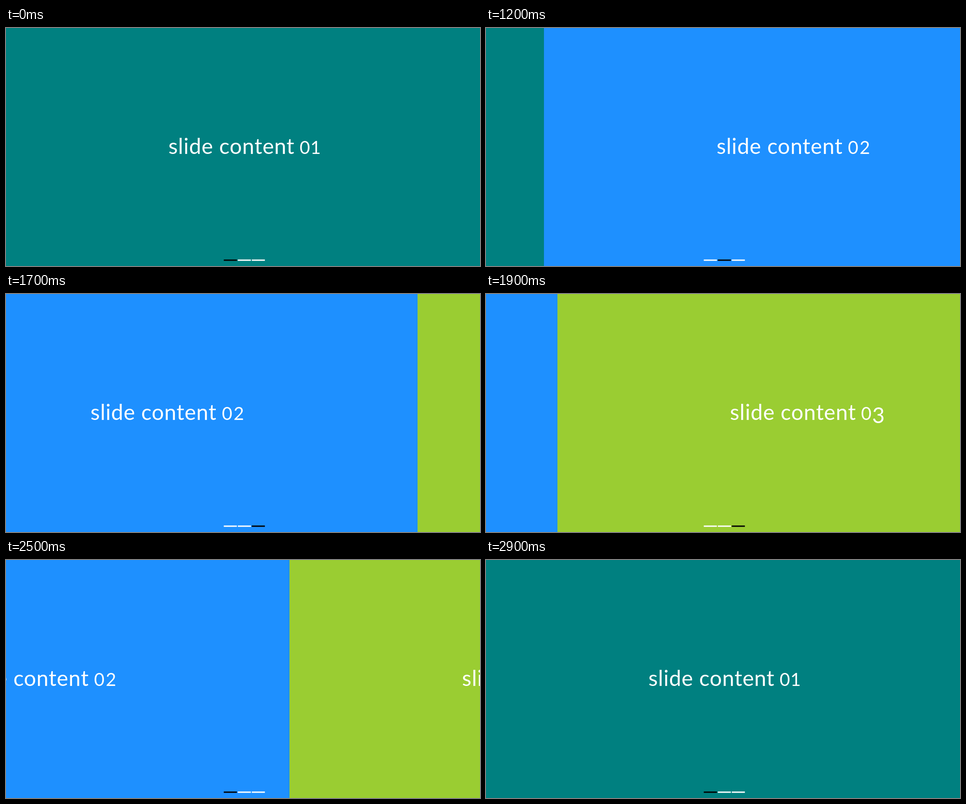
These frames come from a looping animation (1055 by 531 pixels, 3300 ms). An HTML page:

```html
<!DOCTYPE html>
<html lang="en">
<head>
<meta charset="utf-8">
<title>Slider</title>
<style>
  html, body { margin: 0; width: 100%; height: 100%; overflow: hidden; background: #008080; }
  svg { display: block; width: 1055px; height: 531px; }
  rect { shape-rendering: crispEdges; }
  text { font: 48px Lato, sans-serif; letter-spacing: .8px; fill: #fff; }
  .num { font-size: 40px; letter-spacing: 0; text-anchor: middle; }
  .low { font-size: 48px; }
  .bar { fill: #fff; shape-rendering: auto; }
  .bar.on { fill: #000; }
</style>
</head>
<body>
<svg viewBox="0 0 1055 531">
  <g id="track">
    <g>
      <rect x="-556" width="1112" height="531" fill="#008080"/>
      <text y="281"><tspan x="-169">slide content</tspan> <tspan class="num" x="134.5">0</tspan><tspan class="num" x="158.5">1</tspan></text>
    </g>
    <g transform="translate(1112)">
      <rect x="-556" width="1112" height="531" fill="#1e90ff"/>
      <text y="281"><tspan x="-171.5">slide content</tspan> <tspan class="num" x="132.5">0</tspan><tspan class="num" x="158.5">2</tspan></text>
    </g>
    <g transform="translate(2224)">
      <rect x="-556" width="1112" height="531" fill="#9acd32"/>
      <text y="281"><tspan x="-172">slide content</tspan> <tspan class="num" x="131.5">0</tspan><tspan class="num low" x="158.5" dy="7">3</tspan></text>
    </g>
  </g>
  <rect class="bar" x="484.7" y="516.5" width="29.2" height="3"/>
  <rect class="bar" x="515.9" y="516.5" width="29.2" height="3"/>
  <rect class="bar" x="547" y="516.5" width="29.2" height="3"/>
</svg>
<script>
  const LOOP = 3300, TICK = 100, WIDTH = 1112, CENTER = 530.5;
  const moves = [
    { start: 938, time: 462, from: 0, to: 1 },
    { start: 1633, time: 500, from: 1, to: 2 },
    { start: 2400, time: 500, from: 2, to: 0 }
  ];
  const track = document.getElementById('track');
  const bars = document.querySelectorAll('.bar');

  const bezier = (a, b, s) => 3 * a * s * (1 - s) ** 2 + 3 * b * s * s * (1 - s) + s ** 3;

  // CSS "ease": cubic-bezier(.25, .1, .25, 1)
  function ease(x) {
    if (x >= 1) return 1;
    let lo = 0, hi = 1;
    for (let i = 0; i < 24; i++) {
      const mid = (lo + hi) / 2;
      if (bezier(.25, .25, mid) < x) lo = mid; else hi = mid;
    }
    return bezier(.1, 1, lo);
  }

  function draw() {
    // The slider advances ten times a second
    const t = Math.floor(performance.now() % LOOP / TICK) * TICK;
    let pos = 0, active = 0;
    for (const { start, time, from, to } of moves) {
      if (t <= start) break;
      pos = from + (to - from) * ease((t - start) / time);
      active = to;
    }
    track.setAttribute('transform', `translate(${CENTER - pos * WIDTH})`);
    bars.forEach((bar, i) => bar.classList.toggle('on', i === active));
    requestAnimationFrame(draw);
  }
  draw();
</script>
</body>
</html>
```
